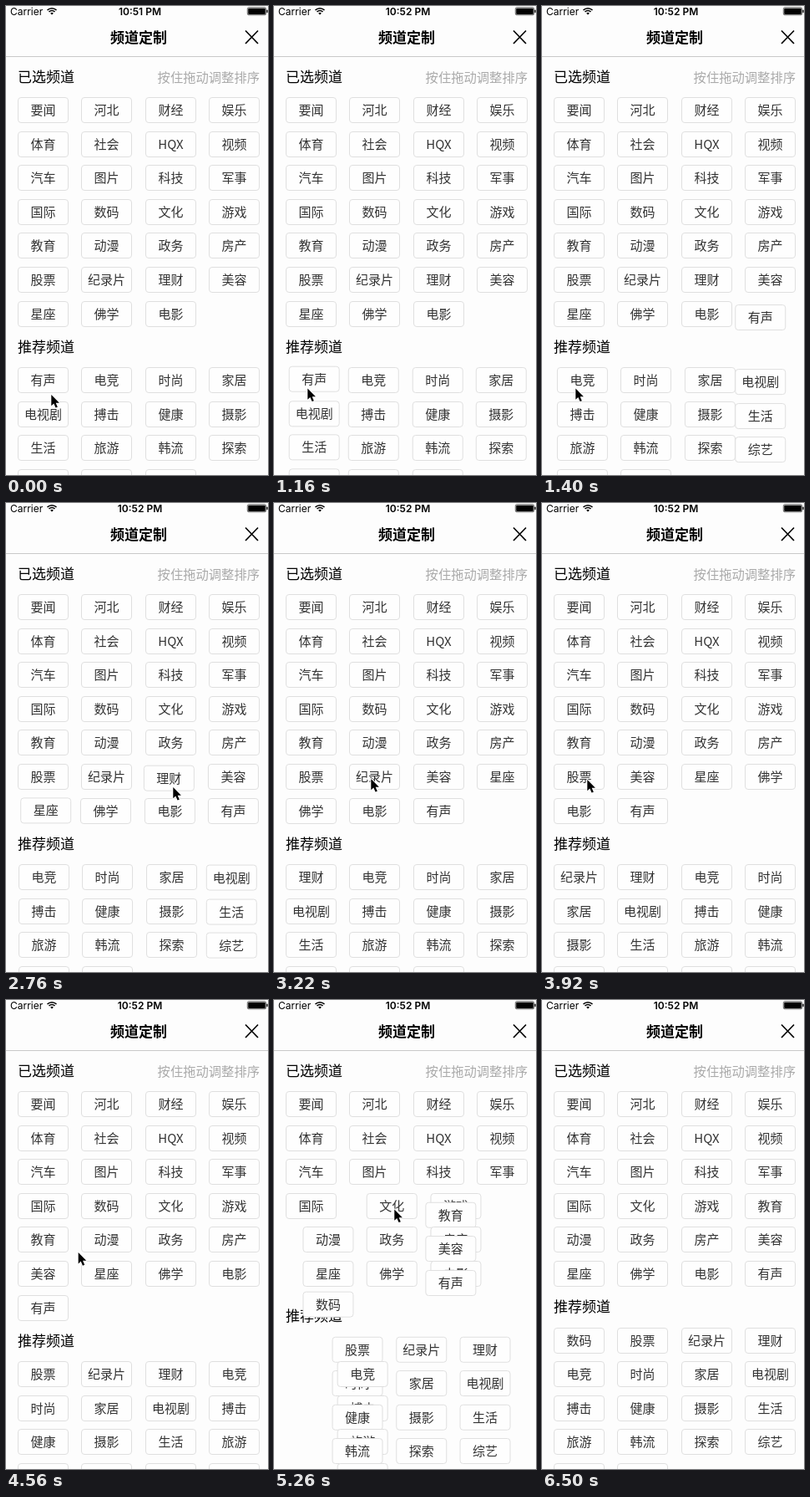
These frames come from a looping animation (314 px wide and 561 px high, 6970 ms). An HTML page:

```html
<!DOCTYPE html>
<html lang="zh-CN">
<head>
<meta charset="utf-8">
<title>频道定制</title>
<style>
  html, body { margin: 0; width: 100%; height: 100%; overflow: hidden; background: #fdfdfd; }
  #stage {
    position: fixed; left: 0; top: 0; width: 314px; height: 561px; overflow: hidden;
    font-family: "Noto Sans CJK SC", "Noto Sans CJK", sans-serif; color: #000;
  }
  #stage > * { position: absolute; white-space: nowrap; }
  .status { top: 0; font: 400 12px/13px Inter, Roboto, sans-serif; }
  #clock { left: 110px; width: 101px; text-align: center; font-weight: 600; }
  .head { left: 14px; top: 0; font-size: 17px; line-height: 24px; }
  #title { left: 59px; top: 25px; width: 200px; text-align: center; font-size: 17px; line-height: 24px; font-weight: 700; }
  #hint { right: 10px; top: 72px; font-size: 15.3px; line-height: 24px; color: #aaa; }
  #rule { left: 0; top: 60px; width: 314px; height: 1px; background: #c9c9c9; }
  .cell {
    left: 0; top: 0; width: 61px; height: 31px; box-sizing: border-box;
    border: 1px solid #dfdfdf; border-radius: 4px; background: #fefefe;
    font-size: 15px; line-height: 28px; text-align: center; color: #333;
  }
  svg { left: 0; top: 0; overflow: visible; }
  #cursor { z-index: 9; }
</style>
</head>
<body>
<div id="stage">
  <div class="status" style="left:5px">Carrier</div>
  <div class="status" id="clock"></div>
  <svg width="314" height="61" fill="none" stroke="#000">
    <path d="M49.5 5A7.8 7.8 0 0 1 60.5 5M51.5 7A4.9 4.9 0 0 1 58.5 7" stroke-width="1.6"/>
    <path d="M55 10.5L53.2 8.7A2.6 2.6 0 0 1 56.8 8.7Z" fill="#000" stroke="none"/>
    <rect x="289.3" y="1.8" width="22.4" height="9" rx="1.8" stroke-width=".6"/>
    <rect x="290.2" y="2.7" width="20.6" height="7.2" rx="1" fill="#000" stroke="none"/>
    <rect x="312.3" y="4.6" width="1.3" height="3.4" rx=".6" fill="#000" stroke="none"/>
    <path d="M287 29.5L302 45M302 29.5L287 45" stroke-width="1.7"/>
  </svg>
  <div id="title">频道定制</div>
  <div id="rule"></div>
  <div class="head" style="top:72px">已选频道</div>
  <div id="hint">按住拖动调整排序</div>
  <div class="head" id="more">推荐频道</div>
  <svg id="cursor" width="12" height="18">
    <path d="M0 0V14.2L3.2 11.2L5.6 16.6L8 15.6L5.7 10.4H10.2Z" fill="#000" transform="translate(.3 .5) scale(.94)"
      stroke="#fff" stroke-width="2" stroke-linejoin="round" paint-order="stroke"/>
  </svg>
</div>
<script>
const LOOP = 6970, SHIFT = 320, ROW = 40.6, COL = 76.33;
const $ = id => document.getElementById(id);

const chosen = ('要闻 河北 财经 娱乐 体育 社会 HQX 视频 汽车 图片 科技 军事 国际 数码 文化 游戏 ' +
  '教育 动漫 政务 房产 股票 纪录片 理财 美容 星座 佛学 电影').split(' ');
const offered = ('有声 电竞 时尚 家居 电视剧 搏击 健康 摄影 生活 旅游 韩流 探索 综艺 历史 文学').split(' ');
const raised = '电竞';

const taps = [[1132, '有声'], [2734, '理财'], [3486, '纪录片'], [4186, '股票'], [5056, '数码']];

// start, end, then the point the pointer reaches
const pointerStart = [54, 464.5];
const pointerMoves = [
  [270, 530, 40, 457],
  [1440, 1880, 200, 339.5],
  [2990, 3220, 116, 329.5],
  [3690, 3920, 54, 330.5],
  [4440, 4730, 144, 250],
  [6010, 6150, 264, 519],
  [6410, 6500, 271, 564]
];

const cells = {};
for (const name of [...chosen, ...offered]) {
  const el = document.createElement('div');
  el.className = 'cell';
  el.textContent = name;
  $('stage').insertBefore(el, $('cursor'));
  cells[name] = el;
}

function layout() {
  const spots = {};
  const place = (names, top) => names.forEach((name, i) => {
    spots[name] = [Math.round(14 + COL * (i % 4)), Math.round(top + ROW * Math.floor(i / 4))];
  });
  const below = ROW * Math.ceil(chosen.length / 4);
  place(chosen, 109);
  place(offered, 148 + below);
  return { spots, head: Math.round(110.8 + below) };
}

function toggle(name) {
  const i = offered.indexOf(name);
  if (i >= 0) chosen.push(...offered.splice(i, 1));
  else offered.unshift(...chosen.splice(chosen.indexOf(name), 1));
}

const layouts = [layout()];
for (const [, name] of taps) {
  toggle(name);
  layouts.push(layout());
}

// cubic-bezier(.42, 0, .58, 1)
function ease(x) {
  if (x <= 0) return 0;
  if (x >= 1) return 1;
  let lo = 0, hi = 1, s;
  for (let i = 0; i < 24; i++) {
    s = (lo + hi) / 2;
    const bx = 1.26 * s * (1 - s) ** 2 + 1.74 * s * s * (1 - s) + s ** 3;
    if (bx < x) lo = s; else hi = s;
  }
  return s * s * (3 - 2 * s);
}

const mix = (a, b, p) => a + (b - a) * p;
const move = (el, x, y) => { el.style.transform = `translate(${x}px, ${y}px)`; };

function drawCells(t) {
  const k = taps.filter(([at]) => at <= t).length;
  const to = layouts[k], from = layouts[Math.max(0, k - 1)];
  const [at, tapped] = k ? taps[k - 1] : [-SHIFT, ''];
  const p = ease((t - at) / SHIFT);
  for (const name in cells) {
    const [ax, ay] = from.spots[name], [bx, by] = to.spots[name];
    move(cells[name], mix(ax, bx, p), mix(ay, by, p));
    cells[name].style.zIndex = name === tapped ? 3 : name === raised ? 2 : 1;
  }
  move($('more'), 0, mix(from.head, to.head, p));
}

function drawPointer(t) {
  let [x, y] = pointerStart;
  for (const [start, end, toX, toY] of pointerMoves) {
    const p = ease((t - start) / (end - start));
    x = mix(x, toX, p);
    y = mix(y, toY, p);
  }
  move($('cursor'), x, y);
}

function render(t) {
  $('clock').textContent = t < 400 ? '10:51 PM' : '10:52 PM';
  drawCells(t);
  drawPointer(t);
}

const began = performance.now();
function tick() {
  render((performance.now() - began) % LOOP);
  requestAnimationFrame(tick);
}
tick();
</script>
</body>
</html>
```
